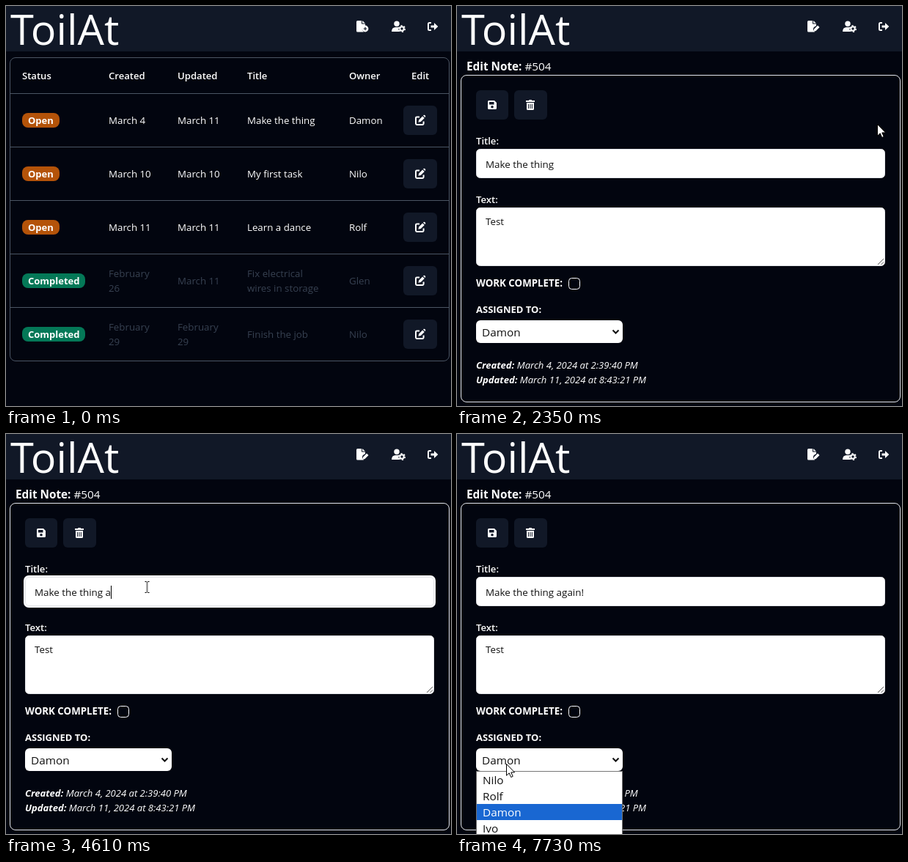
These frames come from a looping animation (607 px wide and 546 px high, 8000 ms). An HTML page:

```html
<!DOCTYPE html>
<html lang="en">
<head>
<meta charset="utf-8">
<title>Task list</title>
<style>
html, body { margin: 0; width: 100%; height: 100%; overflow: hidden; background: #02050f; }
svg { display: block; width: 607px; height: 546px; font: 13.3px "Open Sans", "Noto Sans", sans-serif; fill: #fff; }
text { white-space: pre; }
.open { font-weight: 500; }
.semi { font-weight: 600; font-size: 13.1px; }
.bold { font-weight: 700; }
.badge { font-weight: 700; font-size: 13px; }
.done { fill: #374151; }
.big { font-size: 15.3px; }
.dark { fill: #111; }
.btn { fill: #111827; }
.hover { fill: #1f2937; }
.line { fill: none; stroke: #4b5563; }
.field { fill: #fff; stroke: #e5e7eb; }
.date { font-size: 13.05px; font-style: italic; }

/* Timed parts: keyframe percentages are milliseconds / 80. */
.timed { opacity: 0; animation: 8s step-end infinite; }
.list { animation-name: list; }
.form { animation-name: form; }
.head-hover { animation-name: head-hover; }
.row-hover { animation-name: row-hover; }
.edit-hover { animation-name: edit-hover; }
.save-hover { animation-name: save-hover; }
.focus { animation-name: focus; }
.menu { animation-name: menu; }
.arrow { animation-name: arrow; }
.hand { animation-name: hand; }
.beam { animation-name: beam; }
.press { animation-name: press; }
@keyframes list { 0% { opacity: 1 } 29.375% { opacity: 0 } }
@keyframes form { 0% { opacity: 0 } 29.375% { opacity: 1 } }
@keyframes head-hover { 0%, 12% { opacity: 0 } 10.875% { opacity: 1 } }
@keyframes row-hover { 0% { opacity: 0 } 12% { opacity: 1 } }
@keyframes edit-hover { 0% { opacity: 0 } 20.875% { opacity: 1 } }
@keyframes save-hover { 0%, 86.75% { opacity: 0 } 78.5% { opacity: 1 } }
@keyframes focus { 0%, 95.375% { opacity: 0 } 41.25% { opacity: 1 } }
@keyframes menu { 0% { opacity: 0 } 96.625% { opacity: 1 } }
@keyframes arrow {
  0%, 21.375%, 34.375%, 78.5%, 87.625%, 89.375% { opacity: 0 }
  10.875%, 29.375%, 75%, 86.75%, 88.5%, 91.15% { opacity: 1 }
}
@keyframes hand { 0%, 29.375%, 86.75% { opacity: 0 } 21.375%, 78.5% { opacity: 1 } }
@keyframes beam { 0%, 75%, 88.5%, 91.15% { opacity: 0 } 34.375%, 87.625%, 89.375% { opacity: 1 } }
@keyframes press {
  0%, 29.375%, 46.5%, 96.625% { opacity: 0 }
  28.125%, 41.25%, 95.375% { opacity: .53 }
}

.pointer { animation: move 8s linear infinite; }
@keyframes move {
  0%, 10.875% { transform: translate(484px, 92px) }
  12% { transform: translate(470px, 121px) }
  15.25%, 16.5% { transform: translate(398px, 173px) }
  20.875% { transform: translate(530px, 172px) }
  21.375% { transform: translate(546px, 169px) }
  24.375%, 31.5% { transform: translate(573px, 161px) }
  34.375% { transform: translate(500px, 196px) }
  38.625%, 39.5% { transform: translate(382px, 220px) }
  41.25%, 41.75% { transform: translate(281px, 214px) }
  45.25%, 45.6% { transform: translate(204px, 209px) }
  46.5% { transform: translate(191px, 208px) }
  50.625%, 73.125% { transform: translate(192px, 209px) }
  75% { transform: translate(160px, 194px) }
  79.875%, 86.5% { transform: translate(47px, 144px) }
  93.25%, 100% { transform: translate(67px, 450px) }
}

.title { font-size: 13.4px; line-height: 40px; white-space: pre; color: #111; }
.title::after {
  content: "";
  border-right: 1px solid transparent;
  animation: type 8s step-end infinite, blink 8s step-end infinite;
}
@keyframes type {
  0% { content: "" }
  56% { content: " " }
  57.625% { content: " a" }
  59.75% { content: " ag" }
  60.75% { content: " aga" }
  61.75% { content: " agai" }
  62.75% { content: " again" }
  66.5%, 100% { content: " again!" }
}
@keyframes blink {
  0%, 53.125%, 73.125%, 86.375%, 95.375% { border-color: transparent }
  41.25%, 56%, 79.75%, 93.125% { border-color: #000 }
}
</style>
</head>
<body>
<svg viewBox="0 0 607 546">
  <defs>
    <path id="file" d="M-8 -6.5Q-8 -8 -6.5 -8H-1V-3.5H4V-1Q-1 1 0 5L2 7.5H-6.5Q-8 7.5 -8 6ZM0 -8L4 -4.5H0Z"/>
    <g id="edit">
      <path d="M-1 -4.6H-4.6Q-6 -4.6 -6 -3.2V4.6Q-6 6 -4.6 6H3.2Q4.6 6 4.6 4.6V1.5" fill="none" stroke="#fff" stroke-width="2"/>
      <path d="M-2.6 2.8L-1.8 -.6L3.2 -5.6L5.8 -3L.8 2ZM4 -6.4L5 -7.2Q5.8 -7.6 6.6 -6.8T7.2 -5L6.5 -3.9Z"/>
    </g>
  </defs>

  <rect width="607" height="546" fill="#02050f"/>
  <rect class="btn" width="607" height="62"/>
  <text x="6" y="53" font-size="57.5">ToilAt</text>
  <g transform="translate(535 28)">
    <circle cx="-2" cy="-3.7" r="3.7"/>
    <path d="M-9 7Q-9 1 -3.5 1H1Q-.5 4 1.5 7Z"/>
    <circle cx="5" cy="3" r="2.7" fill="none" stroke="#fff" stroke-width="2"/>
    <circle cx="5" cy="3" r="4.2" fill="none" stroke="#fff" stroke-width="1.6" stroke-dasharray="2.2 2.2"/>
  </g>
  <g transform="translate(582 28)">
    <path d="M-2 -5H-4.5Q-6 -5 -6 -3.5V3.5Q-6 5 -4.5 5H-2" fill="none" stroke="#fff" stroke-width="2"/>
    <path d="M-2.5 -1.6H2V-5L7.3 0L2 5V1.6H-2.5Z"/>
  </g>

  <g class="timed list">
    <use href="#file" x="486" y="28"/>
    <circle cx="490" cy="31" r="4.4"/>
    <path d="M487.7 31H492.3M490 28.7V33.3" stroke="#111827" stroke-width="1.2"/>
    <rect class="btn timed head-hover" x="6" y="71" width="598" height="48"/>
    <rect class="btn timed row-hover" x="6" y="120" width="598" height="72"/>
    <rect class="line" x="5.5" y="70.5" width="599" height="414" rx="7.5"/>
    <g id="table"></g>
  </g>

  <g class="timed form">
    <use href="#file" x="486" y="28"/>
    <path d="M486 35L487 31.5L492 26.5L494.5 29L489.5 34Z"/>
    <text class="big" x="13" y="88"><tspan class="bold">Edit Note:</tspan> #504</text>
    <rect x="5.5" y="94.5" width="599" height="446" rx="7.5" fill="none" stroke="#e5e7eb"/>

    <rect class="btn" x="26" y="115" width="44" height="40" rx="6"/>
    <rect class="hover timed save-hover" x="26" y="115" width="44" height="40" rx="6"/>
    <path fill-rule="evenodd" d="M43.5 129H51L54 132V139.5Q54 141 52.5 141H43.5Q42 141 42 139.5V130.5Q42 129 43.5 129ZM44 131V134.5H50.5V131ZM48 136A1.8 1.8 0 1 0 48 139.6A1.8 1.8 0 1 0 48 136Z"/>
    <rect class="btn" x="78" y="115" width="45" height="40" rx="6"/>
    <path d="M94 129H98L98.7 128H101.5L102.2 129H106V131H94ZM95 132H105V140.5Q105 142 103.5 142H96.5Q95 142 95 140.5Z"/>
    <path d="M97.6 134V140M100 134V140M102.4 134V140" stroke="#111827"/>

    <text class="semi" x="26" y="189">Title:</text>
    <rect class="timed focus" x="24" y="193" width="562" height="44" rx="7"/>
    <rect class="field" x="26.5" y="195.5" width="557" height="39" rx="5"/>
    <foreignObject x="39" y="196" width="500" height="40"><div class="title">Make the thing</div></foreignObject>

    <text class="semi" x="26" y="269">Text:</text>
    <rect class="field" x="26.5" y="275.5" width="557" height="79" rx="5"/>
    <text class="dark" x="39" y="299">Test</text>
    <path d="M574 353L582 345M578.5 353L582 349.5" stroke="#555"/>

    <text class="bold" x="26" y="383">WORK COMPLETE:</text>
    <rect x="152.5" y="371.5" width="15" height="15" rx="4" fill="none" stroke="#fff"/>
    <text class="bold" x="26" y="419" font-size="13">ASSIGNED TO:</text>
    <rect x="26" y="429" width="200" height="31" rx="6"/>
    <text class="big dark" x="34" y="451">Damon</text>
    <path d="M212.5 442.5L216.5 446.5L220.5 442.5" fill="none" stroke="#111" stroke-width="2"/>
    <text class="date" x="26" y="495"><tspan class="bold">Created:</tspan> March 4, 2024 at 2:39:40 PM</text>
    <text class="date" x="26" y="515"><tspan class="bold">Updated:</tspan> March 11, 2024 at 8:43:21 PM</text>

    <g class="timed menu big">
      <rect x="26.5" y="460.5" width="199" height="100" stroke="#767676"/>
      <rect x="27" y="505" width="198" height="22" fill="#1967d2"/>
      <text class="dark" x="35" y="478">Nilo</text>
      <text class="dark" x="35" y="500">Rolf</text>
      <text x="35" y="522">Damon</text>
      <text class="dark" x="35" y="544">Ivo</text>
    </g>
  </g>

  <g class="pointer">
    <circle class="timed press" cx="-1" cy="-1" r="12" fill="#ff0"/>
    <path class="timed arrow" d="M.5 .5V16.2L4.2 12.8L6.7 18.5L9.2 17.4L6.8 11.9H11.6Z" stroke="#000"/>
    <path class="timed hand" d="M-1.8 1.5Q0 -1.2 1.8 1.5V6.5Q3.5 5.2 4.6 7Q6.3 6 7.2 7.8Q9.2 7.2 9.5 9.3V14Q9.5 17 7.5 19V21.5H-.5V19.5L-5 13Q-5.8 10.5 -3.8 10.3L-1.8 12Z" stroke="#000" stroke-width=".8"/>
    <path class="timed beam" d="M-3 -7.5H-1L0 -6.5L1 -7.5H3M0 -6.5V6.5M-3 7.5H-1L0 6.5L1 7.5H3" transform="translate(.5 0)" fill="none" stroke="#000"/>
  </g>
</svg>
<script>
const columns = [22, 140, 234, 329, 468];
const heads = ["Status", "Created", "Updated", "Title", "Owner", "Edit"];
const tasks = [
  ["Open", "March 4", "March 11", "Make the thing", "Damon"],
  ["Open", "March 10", "March 10", "My first task", "Nilo"],
  ["Open", "March 11", "March 11", "Learn a dance", "Rolf"],
  ["Completed", "February|26", "March 11", "Fix electrical|wires in storage", "Glen"],
  ["Completed", "February|29", "February|29", "Finish the job", "Nilo"]
];

const label = (x, y, text, style) => `<text class="${style}" x="${x}" y="${y}">${text}</text>`;
const box = (x, y, w, h, rx, attrs) => `<rect x="${x}" y="${y}" width="${w}" height="${h}" rx="${rx}" ${attrs}/>`;

function cell(x, middle, text, style) {
  const lines = text.split("|");
  return lines.map((line, i) => label(x, middle + 5 + 20 * i - 10 * (lines.length - 1), line, style)).join("");
}

function taskRow([status, ...cells], index) {
  const middle = 156 + 73 * index;
  const open = status === "Open";
  const [width, color] = open ? [51, "#b45309"] : [86, "#047857"];
  const button = style => box(542, middle - 20, 46, 40, 6, `class="${style}"`);
  return `<path class="line" d="M6 ${middle - 36.5}H604"/>`
    + box(22, middle - 10, width, 20, 8, `fill="${color}"`)
    + label(30, middle + 5, status, "badge")
    + cells.map((text, i) => cell(columns[i + 1], middle, text, open ? "open" : "done")).join("")
    + button("btn") + (index ? "" : button("hover timed edit-hover"))
    + `<use href="#edit" x="565" y="${middle}"/>`;
}

document.getElementById("table").innerHTML =
  heads.map((text, i) => label([...columns, 553][i], 100, text, "semi")).join("") + tasks.map(taskRow).join("");
</script>
</body>
</html>
```
